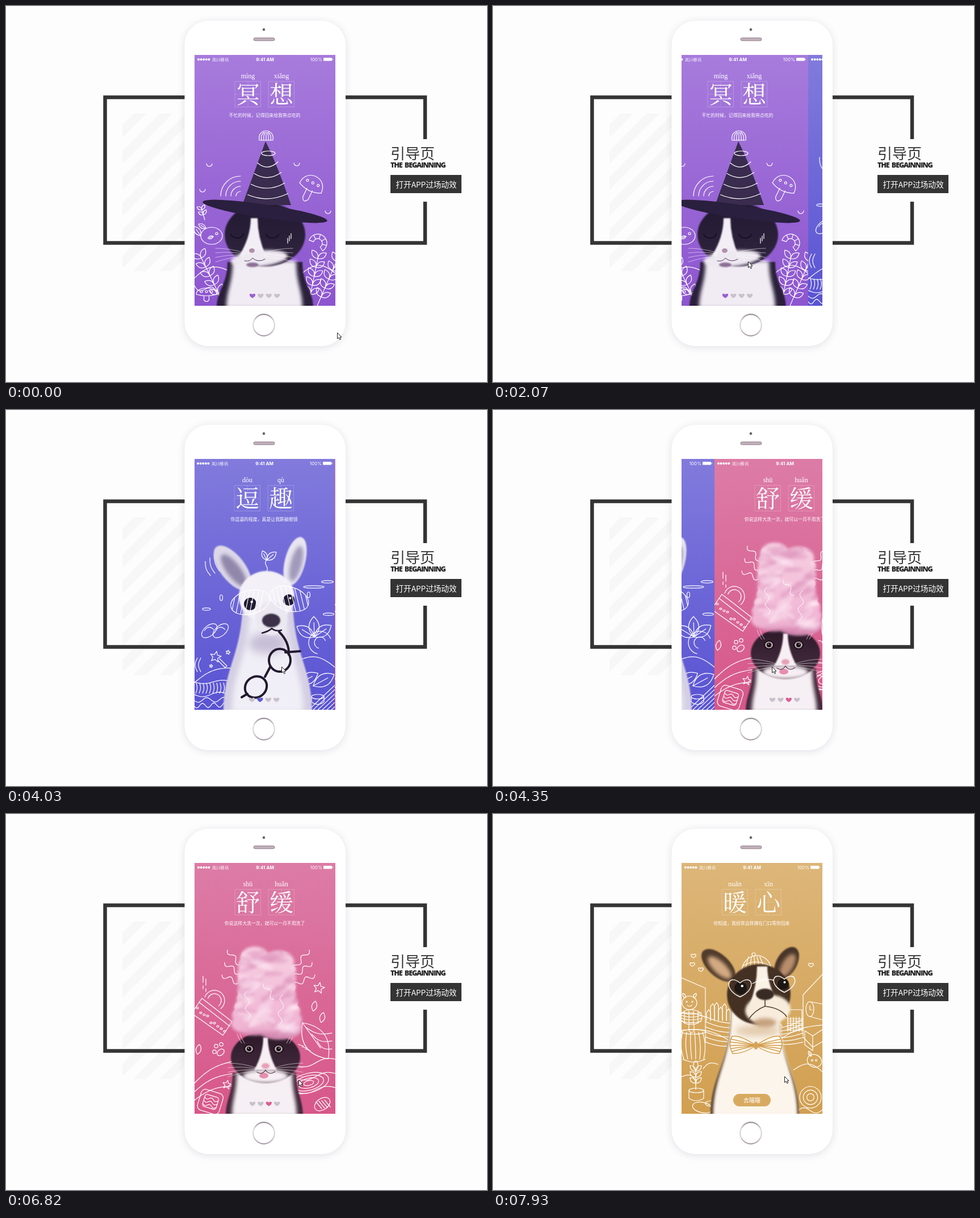
These frames come from a looping animation (847 px wide and 661 px high, 8000 ms). An HTML page with a canvas:

```html
<!DOCTYPE html>
<html lang="zh-CN">
<head>
<meta charset="utf-8">
<title>引导页</title>
<style>
html, body { margin: 0; width: 100%; height: 100%; overflow: hidden; background: #fdfdfd; }
canvas { display: block; }
</style>
</head>
<body>
<canvas id="stage" width="847" height="661"></canvas>
<script>
const SANS = '"Noto Sans CJK SC", "Noto Sans", sans-serif';
const SERIF = '"Noto Serif CJK SC", "Noto Serif SC", "Noto Sans CJK SC", serif';
const SCREEN = { x: 332, y: 86, w: 248, h: 441 };
const { PI, sin, cos, round } = Math;
const stage = document.getElementById('stage').getContext('2d');
let g = stage;

// ---------- basic helpers ----------
function random(seed) {
  return () => (seed = seed * 16807 % 2147483647) / 2147483647;
}
function times(n, fn) {
  for (let i = 0; i < n; i++) fn(i, n > 1 ? i / (n - 1) : 0);
}
function pen(color = '#fff', width = 1.2) {
  g.strokeStyle = color;
  g.lineWidth = width;
}
function paint(path, color, blur = 0) {
  g.save();
  if (blur) g.filter = `blur(${blur}px)`;
  g.fillStyle = color;
  g.fill(path);
  g.restore();
}
function ell(x, y, rx, ry = rx, rot = 0) {
  const p = new Path2D();
  p.ellipse(x, y, rx, ry, rot, 0, 2 * PI);
  return p;
}
function box(x, y, w, h, r) {
  const p = new Path2D();
  p.roundRect(x, y, w, h, r);
  return p;
}
const draw = d => g.stroke(new Path2D(d));
const oval = (...a) => g.stroke(ell(...a));
function within(path, fn) {
  g.save();
  g.clip(path);
  fn();
  g.restore();
}
function at(x, y, rot, fn) {
  g.save();
  g.translate(x, y);
  g.rotate(rot);
  fn();
  g.restore();
}
function mirror(cx, fn) {
  for (const s of [1, -1]) {
    g.save();
    g.translate(cx, 0);
    g.scale(s, 1);
    fn(s);
    g.restore();
  }
}
function fade(y0, y1, ...colors) {
  const l = g.createLinearGradient(0, y0, 0, y1);
  colors.forEach((c, i) => l.addColorStop(i / (colors.length - 1), c));
  return l;
}
function text(s, x, y, font, color = '#fff', align = 'center') {
  g.font = font;
  g.fillStyle = color;
  g.textAlign = align;
  g.fillText(s, x, y);
}

// ---------- line doodles ----------
function wave(x0, y0, x1, y1, amp, n = 1) {
  const dx = x1 - x0, dy = y1 - y0, len = Math.hypot(dx, dy);
  g.beginPath();
  times(30, (i, u) => {
    const s = amp * sin(PI * n * u) / len;
    g.lineTo(x0 + dx * u - dy * s, y0 + dy * u + dx * s);
  });
  g.stroke();
}
function arcs(x, y, r, step, n, a0, a1) {
  times(n, i => {
    g.beginPath();
    g.arc(x, y, r + step * i, a0, a1);
    g.stroke();
  });
}
function rings(x, y, rx, ry, rot, n) {
  times(n, i => oval(x, y, rx * (1 - i / n), ry * (1 - i / n), rot));
}
function star(x, y, r) {
  g.beginPath();
  times(10, i => {
    const a = 0.2 + i * PI / 5, q = i % 2 ? r * 0.45 : r;
    g.lineTo(x + q * sin(a), y - q * cos(a));
  });
  g.closePath();
  g.stroke();
}
function leaf(x, y, len, angle, vein = true) {
  at(x, y, angle, () => {
    const w = len * 0.5;
    draw(`M0 0Q${len / 2} ${-w} ${len} 0Q${len / 2} ${w} 0 0`);
    if (vein) draw(`M0 0H${len * 0.7}`);
  });
}
function twig(x0, y0, x1, y1, n, len) {
  const a = Math.atan2(y1 - y0, x1 - x0);
  draw(`M${x0} ${y0}L${x1} ${y1}`);
  times(n, i => {
    const u = (i + 1) / n, x = x0 + (x1 - x0) * u, y = y0 + (y1 - y0) * u;
    leaf(x, y, len, a - 0.8, false);
    leaf(x, y, len, a + 0.8, false);
  });
}
function mushroom(x, y, r, h, rot) {
  at(x, y, rot, () => {
    draw(`M${-r} 0C${-r} ${-h * 1.5} ${r} ${-h * 1.5} ${r} 0Q0 ${h * 0.5} ${-r} 0`);
    draw(`M${-r / 4} 3V${h}Q0 ${h * 1.5} ${r / 4} ${h}V3`);
    times(3, i => oval((i - 1) * r / 2, -h / 2, 2));
  });
}
function heart(x, y, s) {
  const p = new Path2D();
  p.moveTo(x, y + 5 * s);
  for (const d of [-s, s]) {
    if (d < 0) p.bezierCurveTo(x + 9 * d, y + s, x + 6 * d, y - 7 * s, x, y - 2 * s);
    else p.bezierCurveTo(x + 6 * d, y - 7 * s, x + 9 * d, y + s, x, y + 5 * s);
  }
  return p;
}

// ---------- soft animal shapes ----------
function torso(cx, top, neck, base, color, blur = 1) {
  const h = 531 - top, p = new Path2D();
  p.moveTo(cx - neck, top);
  p.bezierCurveTo(cx - neck, top + h * 0.5, cx - base, top + h * 0.6, cx - base, 531);
  p.lineTo(cx + base, 531);
  p.bezierCurveTo(cx + base, top + h * 0.6, cx + neck, top + h * 0.5, cx + neck, top);
  paint(p, color, blur);
}
function blaze(x0, y0, w0, x1, y1, w1, color) {
  const my = (y0 + y1) / 2;
  paint(new Path2D(`M${x0 - w0} ${y0}Q${x0 - w0} ${my} ${x1 - w1} ${y1}H${x1 + w1}Q${x0 + w0} ${my} ${x0 + w0} ${y0}Z`), color, 1);
}
function ear(x, y, len, w, rot, color, inner) {
  paint(ell(x, y, len, w, rot), color, 1);
  paint(ell(x + 2, y + 4, len * 0.72, w * 0.55, rot), inner, 3);
}
function eye(x, y, r, color) {
  paint(ell(x, y, r), color, 0.5);
  paint(ell(x + r / 4, y - r / 3, r / 5), '#fff');
}
function whiskers(cx, y, reach) {
  pen('rgba(255,255,255,.75)', 0.7);
  mirror(cx, () => times(4, i => draw(`M17 ${y + i * 2}Q${reach * 0.6} ${y - 8 + i * 5} ${reach} ${y - 8 + i * 8}`)));
}

// ---------- page parts ----------
function header(p) {
  times(5, i => paint(ell(339 + i * 4.6, 94, 2), '#fff'));
  text('岚川移讯', 363, 97, `7.3px ${SANS}`, '#fff', 'left');
  text('9:41 AM', 456, 97, 'bold 8px Inter, sans-serif');
  text('100%', 557, 97, '8px Inter, sans-serif', '#fff', 'right');
  paint(box(559, 91, 15, 5.6, 1), '#fff');
  paint(box(574.5, 92.7, 1.2, 2.4, 0), '#fff');
  [426, 485].forEach((x, i) => {
    pen('rgba(255,255,255,.22)', 1);
    g.strokeRect(x - 22.5, 132.5, 45, 45);
    g.setLineDash([2, 2]);
    draw(`M${x} 133V177M${x - 22} 155H${x + 22}`);
    g.setLineDash([]);
    text(p.pinyin[i], x, 127, '12px "Liberation Serif", serif');
    text(p.title[i], x, 171, `500 42px ${SERIF}`);
  });
  text(p.note, 455.5, 195, `300 7.88px ${SANS}`);
}
function pager(active, color) {
  times(4, i => paint(heart(434 + i * 14.4, 509, 0.9), i === active ? color : '#c9c1cb'));
}

// ---------- artwork ----------
function hatCat() {
  pen();
  wave(332, 478, 398, 468, -14);
  wave(332, 492, 390, 508, 6, 3);
  wave(521, 470, 580, 470, -14);
  arcs(413, 334, 8, 9, 4, PI, 1.5 * PI);
  for (const [x, y] of [[512, 276], [358, 277], [346, 322], [567, 360]]) arcs(x, y, 5, 0, 1, 0, PI);
  twig(350, 376, 345, 358, 2, 10);
  oval(362, 404, 19, 15);
  oval(371, 400, 2);
  leaf(343, 404, 20, -2.2);
  leaf(352, 391, 15, -2.6);
  leaf(365, 405, 10, 2.8);
  mushroom(536, 320, 21, 20, 0.45);
  mushroom(353, 507, 18, 10, 0);
  arcs(549, 417, 8, 8, 2, -2.8, 1);
  times(6, i => at(549, 417, -2.8 + i * 0.76, () => draw('M8 0H16')));
  for (const [x, y, tilt] of [[382, 521, -38], [533, 522, 16], [548, 527, 34]]) twig(x, y, x + tilt, y - 78, 5, 18);

  torso(456, 450, 66, 85, '#2a2039');
  torso(455, 448, 56, 67, '#f1ecf4', 3);
  paint(ell(456, 402, 71, 56), fade(350, 455, '#211832', '#32263f'), 1);
  blaze(437, 373, 6, 434, 440, 24, '#f3eef5');
  paint(ell(446, 444, 50, 14, -0.1), '#eee8f1', 2.5);
  paint(ell(433, 430, 5, 4), '#ae91ad', 0.6);
  paint(ell(434, 455, 11, 4), '#8d7096', 1);
  pen('#171024', 2);
  for (const x of [407, 469]) arcs(x, 395, 13, 0, 1, 0.5, 2.6);
  pen('#4a3856', 1);
  draw('M420 448Q430 450 434 443Q444 452 456 445');
  whiskers(437, 434, 68);

  paint(new Path2D('M457 238L416 350H502Q476 275 457 238'), '#392c4e', 0.6);
  paint(ell(456, 361, 111, 12, 0.15), '#2a1f3e', 0.5);
  pen();
  oval(462, 259, 12, 4);
  times(4, i => {
    const w = 18 + i * 5.8, y = 276 + i * 18.6;
    draw(`M${461 - w} ${y}Q461 ${y + 15} ${461 + w} ${y - 2}`);
  });
  draw('M446 236C442 214 474 214 470 236Z');
  times(5, i => draw(`M${450 + i * 4} 236Q${448 + i * 5} 228 ${454 + i * 2} 222`));
  times(3, i => draw(`M${496 + i * 3} ${408 - i * 4}v9`));
  pager(0, '#9a5fd3');
}

function paleDog() {
  pen();
  wave(332, 480, 409, 454, -10);
  wave(508, 444, 580, 452, -14);
  wave(332, 478, 400, 478, 3, 2);
  times(11, i => wave(336 + i * 6, 480, 335 + i * 6, 498, -2));
  times(3, i => wave(332, 500 + i * 10, 392, 500 + i * 9, 4, 2 + i * 2));
  times(7, i => draw(`M${532 + i * 8} 529l48 -45`));
  times(3, i => wave(352 + i * 8, 266 - i * 6, 361 + i * 8, 291 - i * 4, 3));
  for (const x of [338, 344]) wave(x, 436, x, 460, 4);
  const rnd = random(7);
  for (const [x, y] of [[354, 350], [543, 311], [567, 302], [569, 359]]) oval(x, y, 7 + rnd() * 12, 2.2);
  for (const [x, y] of [[380, 330], [416, 405], [534, 325]]) oval(x, y, 2.5, 5);
  for (const x of [359, 379]) {
    oval(x, 388, 16, 9, -0.7);
    arcs(x, 391, 9, 0, 1, 3.5, 5.7);
  }
  star(370, 434, 10);
  star(392, 426, 4);
  star(362, 450, 3);
  draw('M374 440l13 13l3 -3l-13 -13');
  arcs(554, 409, 10, 10, 2, 1.8, 5.9);
  times(3, i => leaf(544, 399, 36, -2.6 + i));
  leaf(517, 481, 38, -0.5);
  leaf(542, 485, 42, -0.5);
  oval(550, 504, 11, 4);
  draw('M539 504v9Q550 522 561 513v-9');
  wave(459, 285, 460, 263, 2, 2);
  leaf(460, 264, 18, -2);
  leaf(460, 264, 22, -0.7);

  ear(400, 278, 47, 22, 0.92, '#dcd8e8', '#9087aa');
  ear(510, 266, 44, 18, -1.32, '#e8e5f1', '#a19aba');
  torso(462, 330, 44, 78, '#d4cfe3');
  torso(462, 340, 32, 63, '#f0eef6', 5);
  paint(ell(462, 410, 34, 18), '#c5bed6', 8);
  paint(ell(460, 328, 49, 45), '#f3f0f7', 1);
  paint(ell(468, 366, 28, 30), '#ece8f1', 1.5);
  eye(431, 341, 11, '#211b32');
  eye(499, 334, 10, '#211b32');
  paint(ell(468, 370, 16, 12), '#3b3047', 0.8);
  pen('#281f36', 2.5);
  draw('M452 392Q464 389 469 384Q476 390 486 387');
  pen('#21192f', 4);
  draw('M482 390Q500 408 499 430M493 426L519 424M466 452L457 469M426 499L416 505');
  oval(483, 440, 19, 20);
  oval(441, 487, 20, 18, -0.7);
  pen();
  for (const [x, y, rot] of [[431, 338, -0.25], [500, 332, 0.3]]) {
    const lens = ell(x, y, 35, 21, rot);
    g.stroke(lens);
    within(lens, () => times(9, i => draw(`M${x - 40 + i * 8} ${y - 25}l${rot * 40} 50`)));
  }
  pager(1, '#5c58d2');
}

function foamCat() {
  pen();
  mirror(462, () => times(3, i => wave(-72 - i * 5, 239 + i * 22, -43, 274 + i * 14, 4, 4)));
  for (const x of [347, 352]) draw(`M${x} ${x - 62}v11m0 6v5`);
  times(3, i => draw(`M${515 + i * 6} ${405 + i * 4}l9 3`));
  star(551, 306, 10);
  star(389, 476, 8);
  for (const [x, y] of [[545, 329], [559, 349], [341, 405]]) leaf(x, y, 18, 1.8, false);
  for (const [x, y] of [[370, 408], [379, 405], [367, 418]]) oval(x, y, 3.2);
  oval(378, 419, 7, 5, -0.7);
  draw('M332 343L345 324L398 365L382 389L332 354M340 331l54 42');
  arcs(367, 328, 12, 6, 2, -2.8, 0.9);
  const rnd = random(11);
  times(9, i => oval(337 + i * 6, 341 + i * 4.6 + rnd() * 9, 2, 1.5));
  leaf(522, 367, 78, 0.95);
  times(3, i => wave(528 + i * 10, 375 + i * 12, 574, 385 + i * 14, 6));
  times(3, i => {
    wave(332, 473 + i * 15, 402, 434 + i * 22, -7);
    wave(512, 443 + i * 23, 580, 431 + i * 25, 4, 2);
  });
  rings(533, 473, 36, 17, -0.25, 4);
  at(360, 505, 0.3, () => {
    g.stroke(box(-20, -18, 40, 38, 8));
    g.stroke(box(-12, -10, 25, 22, 4));
    times(3, i => wave(-11, -4 + i * 6, 12, -4 + i * 6, 2, 3));
  });
  oval(557, 510, 15, 10, -0.6);
  times(4, i => draw(`M${546 + i * 5} ${506 - i}l10 12`));

  torso(455, 455, 56, 68, '#432a3c');
  torso(455, 455, 49, 57, '#f6f0f4', 3);
  paint(ell(457, 428, 61, 45), fade(385, 470, '#2d1829', '#463040'), 1);
  paint(ell(457, 461, 40, 12), '#f7eff3', 3);
  blaze(457, 393, 4, 457, 450, 20, '#f7eff3');
  paint(ell(457, 443, 7, 5), '#e7a0b5', 0.8);
  paint(ell(454, 460, 8, 5), '#e58ead', 0.6);
  mirror(454, () => {
    paint(ell(26, 413, 9, 7.5), '#160d17');
    paint(ell(26, 413, 7, 6), '#b9a4a6');
    eye(26, 413, 4, '#130b15');
  });
  pen('#5b3548');
  draw('M442 454Q452 459 457 450Q463 460 474 453');
  whiskers(457, 446, 66);
  pen('rgba(255,255,255,.8)', 0.8);
  mirror(457, () => times(2, i => draw(`M${37 + i * 5} 403q6 -10 8 -16`)));

  // piled foam: a column of puffs with seeded wisps inside
  const foam = new Path2D();
  times(18, (i, u) => {
    const side = i % 2 ? 1 : -1, y = 253 + u * 123, w = 25 + 14 * u + 3 * sin(u * 9);
    foam.addPath(ell(459 + side * (u < 0.3 ? 21 : 22), y, w, 20));
  });
  paint(foam, fade(235, 395, '#f7cfe2', '#f3c0da', '#eeb0d0'), 2.5);
  within(foam, () => {
    times(60, () => {
      const x = 395 + rnd() * 128, y = 238 + rnd() * 145;
      paint(ell(x, y, 9 + rnd() * 16, 3 + rnd() * 5, rnd() * 1.4 - 0.9), rnd() < 0.55 ? 'rgba(255,235,245,.45)' : 'rgba(216,135,180,.38)', 2.5);
    });
    paint(ell(459, 390, 58, 8), 'rgba(190,100,150,.5)', 4);
  });
  pen('#fff', 1);
  wave(424, 312, 426, 360, 4, 4);
  wave(454, 298, 472, 326, 4, 3);
  wave(487, 318, 481, 370, 4, 4);
  pager(2, '#db5d91');
}

function warmDog() {
  pen();
  draw('M332 288L374 306V401M580 282L546 318V390');
  times(6, i => {
    wave(374, 356 + i * 9, 424, 368 + i * 8, 3);
    wave(492, 378 + i * 5, 546, 361 + i * 8, 3);
    draw(`M${519 + i * 5} 357v25M518 ${360 + i * 4}h28`);
  });
  wave(332, 350, 374, 357, -3);
  wave(332, 380, 419, 400, -9);
  wave(500, 400, 580, 371, -7);
  const rnd = random(5);
  times(6, i => {
    const h = 14 + rnd() * 16;
    draw(`M${376 + i * 7} 363v${-h}l4 -5l3 5v${h}`);
  });
  draw('M518 357v-13h26v13M492 373l8 -10l9 10');
  for (const [x, y] of [[353, 249], [351, 264], [366, 273], [560, 265]]) g.stroke(heart(x, y, 0.75));
  oval(346, 332, 13, 12);
  mirror(346, () => {
    leaf(7, 323, 9, -1, false);
    oval(5, 330, 1);
  });
  arcs(346, 333, 5, 0, 1, 0.6, 2.5);
  oval(349, 357, 19, 13);
  times(4, i => draw(`M332 ${349 + i * 5}q18 6 35 0M${337 + i * 8} 346v22`));
  g.stroke(box(345, 367, 9, 17, 4));
  times(6, i => wave(334 + i * 7, 383, 336 + i * 7, 431, 4 - i * 1.5));
  oval(353, 383, 21, 4);
  wave(334, 431, 374, 431, 5);
  oval(358, 486, 13, 4);
  draw('M345 486v14Q358 508 371 500v-14');
  twig(357, 484, 357, 452, 3, 14);
  oval(357, 442, 4, 8);
  wave(332, 462, 358, 470, -7);
  wave(370, 448, 396, 440, -6);
  oval(369, 516, 18, 9, 0.2);
  oval(384, 509, 10, 5);
  oval(558, 343, 7, 13);
  draw('M558 330l22 4M558 356l22 6M558 337v7h4M549 381l14 9l17 -11M549 381v25l14 10v-26M546 392l17 18l17 -10');
  wave(529, 450, 580, 453, -12);
  oval(566, 434, 13, 11, 0.4);
  leaf(560, 426, 10, -2);
  for (const x of [562, 569]) oval(x, 433, 1.5);
  rings(559, 498, 19, 19, 0, 3);
  wave(536, 522, 580, 520, -5, 2);
  draw('M437 279C440 240 486 240 490 273M440 267q22 -14 48 0M438 275q24 -14 52 0');
  times(5, i => draw(`M${450 + i * 5} 251L${445 + i * 8} 269`));
  oval(459, 247, 3);

  torso(461, 345, 42, 78, '#5a422f', 1.2);
  torso(462, 345, 43, 74, '#fcf5eb', 2);
  paint(ell(466, 381, 40, 10), '#e3cbae', 6);
  ear(397, 266, 37, 19, 0.75, '#513c2c', '#d3aa82');
  ear(517, 262, 31, 18, -1.05, '#49362a', '#b98e6c');
  paint(ell(468, 317, 56, 53, -0.1), '#443124', 1);
  blaze(474, 268, 9, 478, 335, 26, '#fbf2e6');
  paint(ell(484, 344, 40, 26, -0.08), '#f8ecdd', 2);
  paint(ell(479, 367, 20, 8), '#c6a27e', 3);
  paint(ell(479, 317, 16, 10), '#382b24', 0.8);
  pen('#574335', 1.7);
  draw('M479 326V338Q462 344 449 362M479 338Q506 341 517 356');
  eye(436, 306, 11, '#1d1713');
  eye(511, 299, 10, '#1d1713');
  pen('#fff', 1.4);
  g.stroke(heart(435, 304, 3.5));
  g.stroke(heart(513, 297, 3.3));
  draw('M457 298Q474 288 494 292');
  pen('#d19a49', 1.5);
  mirror(463, () => {
    const bow = new Path2D('M0 407Q28 388 42 391Q50 404 41 421Q22 422 0 407');
    paint(bow, '#fff8ed');
    g.stroke(bow);
    within(bow, () => times(5, i => draw(`M0 407Q22 ${400 + i * 3} 47 ${395 + i * 6}`)));
  });
  paint(ell(463, 407, 4, 7), '#d6a55a');
  paint(box(423, 492, 66, 22, 11), '#d8aa60');
  text('去瞄瞄', 456, 506.5, `300 10px ${SANS}`);
}

const pages = [
  { pinyin: ['míng', 'xiǎng'], title: '冥想', note: '不忙的时候，记得回来给我带点吃的', bg: ['#a77bdc', '#8d55cf'], art: hatCat },
  { pinyin: ['dòu', 'qù'], title: '逗趣', note: '你逗逼的程度，真是让我跌破眼镜', bg: ['#827bdc', '#5953d3'], art: paleDog },
  { pinyin: ['shū', 'huǎn'], title: '舒缓', note: '你说这样大洗一次，就可以一月不用洗了', bg: ['#dc7ca6', '#d75789'], art: foamCat },
  { pinyin: ['nuǎn', 'xīn'], title: '暖心', note: '你知道，我经常这样蹲在门口等你回来', bg: ['#ddb679', '#d19f50'], art: warmDog }
];

function layer(w, h, fn) {
  const c = document.createElement('canvas');
  c.width = w;
  c.height = h;
  g = c.getContext('2d');
  g.lineCap = g.lineJoin = 'round';
  fn();
  g = stage;
  return c;
}

function backdrop() {
  g.fillStyle = '#fdfdfd';
  g.fillRect(0, 0, 847, 661);
  within(box(205, 189, 150, 277, 10), () => {
    pen('#f7f7f7', 16);
    times(11, k => draw(`M195 ${230 + k * 46}l200 -200`));
  });
  g.lineCap = 'butt';
  g.lineJoin = 'miter';
  pen('#333433', 6.5);
  draw('M738 234V160.5H174.5V416.5H738V344');

  g.save();
  g.shadowColor = 'rgba(40,40,90,.13)';
  g.shadowBlur = 14;
  g.shadowOffsetY = 2;
  g.fillStyle = '#fff';
  g.fill(box(314.5, 26, 283.5, 572, 42));
  g.restore();
  paint(ell(454, 41.5, 2.4), '#85777f');
  paint(ell(454, 41.5, 1), '#443b45');
  const speaker = box(436, 56, 37, 5, 2.5);
  paint(speaker, '#c0b1bb');
  pen('#8f7d8b', 1);
  g.stroke(speaker);
  pen(fade(541, 581, '#948994', '#dedbe0', '#d6d2d8', '#a99ca7'), 2.2);
  oval(454, 561, 18.8);

  text('引导页', 677, 269, `300 26px ${SANS}`, '#333433', 'left');
  g.letterSpacing = '-1.1px';
  text('THE  BEGAINNING', 677, 284, '900 12.5px "Open Sans", "Noto Sans", sans-serif', '#222', 'left');
  g.letterSpacing = '0px';
  paint(box(677, 297, 125, 32, 0), '#333433');
  text('打开APP过场动效', 740, 318.5, `13.6px ${SANS}`);
}

const back = layer(847, 661, backdrop);
const sheets = pages.map(p => layer(SCREEN.w, SCREEN.h, () => {
  g.translate(-SCREEN.x, -SCREEN.y);
  g.fillStyle = fade(86, 527, ...p.bg);
  g.fillRect(SCREEN.x, SCREEN.y, SCREEN.w, SCREEN.h);
  p.art();
  header(p);
}));

// ---------- motion ----------
const TICK = 75, DRAG = 74;
// start, end, pointer x and y reached; a swipe also turns the page
const moves = [
  { t: [70, 270], to: [530, 497] },
  { t: [580, 730], to: [534, 485] },
  { t: [1130, 1520], to: [531, 447] },
  { t: [1780, 2540], to: [522, 449], swipe: true },
  { t: [3010, 3260], to: [532, 451] },
  { t: [3950, 4510], to: [490, 451], swipe: true },
  { t: [5510, 5740], to: [506, 455] },
  { t: [6040, 6360], to: [511, 470] },
  { t: [6820, 6970], to: [516, 466] },
  { t: [7220, 7930], to: [513, 461], swipe: true }
];
const turn = u => u ** 2.56 / (u ** 2.56 + 3.2 * (1 - u) ** 2.56);

function pose(time) {
  let x = 583, y = 574, scroll = 0;
  for (const { t: [t0, t1], to, swipe } of moves) {
    if (time < t0) break;
    const last = round((t1 - t0) / TICK);
    const k = Math.min(last, Math.floor((time - t0) / (t1 - t0) * last + 0.3));
    const u = (k + 1) / (last + 1), ease = 1 - (1 - u) ** 3;
    x += (to[0] - x) * ease;
    y += (to[1] - y) * ease;
    if (swipe) {
      const pull = Math.min(1, Math.max(0, (u - 0.2) / 0.5));
      x -= DRAG * sin(PI * pull);
      scroll += SCREEN.w * turn(k / last);
    }
  }
  return { x: round(x), y: round(y), scroll: round(scroll) };
}
const arrow = new Path2D('M.5 .5V11L3 8.8L4.8 12.6L6.6 11.8L4.9 8.1H8Z');

function frame(now) {
  const { x, y, scroll } = pose(now % 8000);
  g.drawImage(back, 0, 0);
  within(box(SCREEN.x, SCREEN.y, SCREEN.w, SCREEN.h, 0), () => sheets.forEach((s, i) => {
    const dx = i * SCREEN.w - scroll;
    if (Math.abs(dx) < SCREEN.w) g.drawImage(s, SCREEN.x + dx, SCREEN.y);
  }));
  at(x, y, 0, () => {
    paint(arrow, '#fff');
    pen('#222', 1);
    g.stroke(arrow);
  });
  requestAnimationFrame(frame);
}
requestAnimationFrame(frame);
</script>
</body>
</html>
```
